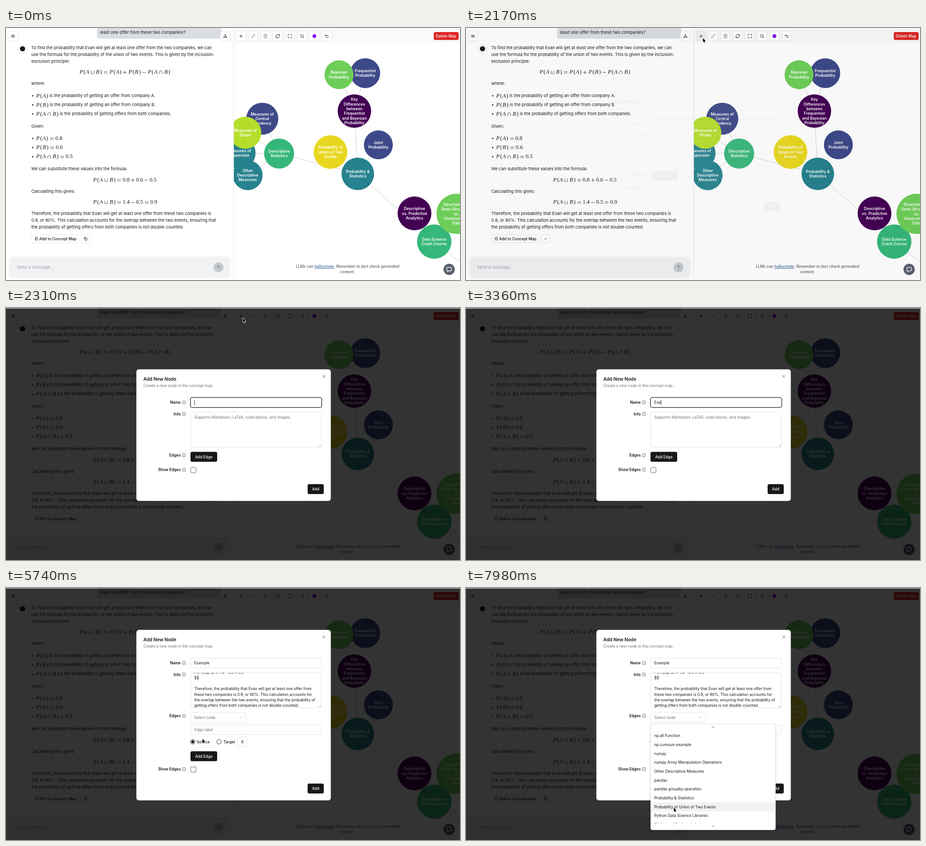
Write an HTML page with a canvas that moves like this. It is 1004 px wide and 558 px high and loops after 8 s.

```html
<!DOCTYPE html>
<html lang="en">
<head>
<meta charset="utf-8">
<title>Concept map</title>
<style>
html, body { margin: 0; width: 100%; height: 100%; overflow: hidden; background: #fff; }
canvas { display: block; width: 1004px; height: 558px; }
</style>
</head>
<body>
<canvas id="stage" width="1004" height="558"></canvas>
<script>
const stage = document.getElementById('stage').getContext('2d');
const layer = Object.assign(document.createElement('canvas'), { width: 1004, height: 558 }).getContext('2d');
let ctx = stage;
const LOOP = 8000, BODY = 9.37, SMALL = 8.37, INK = '#18181b', LINE = '#e4e4e7', HINT = '#71717a';

const ICONS = {
  menu: 'M4 7h16M4 12h16M4 17h16',
  tree: 'M12 6v6l-6 5M12 12l6 5M14 5a2 2 0 1 1-4 0a2 2 0 1 1 4 0M7 18a2 2 0 1 1-4 0a2 2 0 1 1 4 0M21 18a2 2 0 1 1-4 0a2 2 0 1 1 4 0M12 12v6',
  plus: 'M5 12h14M12 5v14',
  pencil: 'M17 3l4 4L8 20l-5 1 1-5zM14 6l4 4',
  trash: 'M3 6h18M19 6v14a2 2 0 0 1-2 2H7a2 2 0 0 1-2-2V6M8 6V4a2 2 0 0 1 2-2h4a2 2 0 0 1 2 2v2M10 11v6M14 11v6',
  refresh: 'M3 12a9 9 0 0 1 15.5-6.2L21 8M21 3v5h-5M21 12a9 9 0 0 1-15.5 6.2L3 16M3 21v-5h5',
  expand: 'M3 8V3h5M16 3h5v5M21 16v5h-5M8 21H3v-5',
  search: 'M18 11a7 7 0 1 1-14 0a7 7 0 1 1 14 0M16 16l5 5',
  undo: 'M9 14L4 9l5-5M4 9h10.5a5.5 5.5 0 0 1 0 11H11',
  copy: 'M9 9h11v12H9zM5 15H4V3h11v3',
  check: 'M5 12l5 5L20 7',
  enter: 'M9 7V3h11v18H9v-4M3 12h11M10 8l4 4-4 4',
  up: 'M12 20V4M5 11l7-7 7 7',
  chat: 'M4 4h16v12h-9l-4 4v-4H4z',
  down: 'M6 9l6 6 6-6',
  upward: 'M6 15l6-6 6 6',
  close: 'M6 6l12 12M18 6L6 18'
};

const clamp = v => Math.min(1, Math.max(0, v));
const easeOut = v => 1 - (1 - clamp(v)) ** 2;
const smooth = v => v * v * (3 - 2 * v);

// Paints a panel as one group: faded as a whole and zoomed about (cx, cy).
function popIn(p, cx, cy, slide, paint) {
  const scale = .95 + .05 * p;
  layer.clearRect(0, 0, 1004, 558);
  layer.save();
  layer.translate(cx, cy - slide * (1 - p));
  layer.scale(scale, scale);
  layer.translate(-cx, -cy);
  ctx = layer;
  paint();
  ctx = stage;
  layer.restore();
  ctx.globalAlpha = p;
  ctx.drawImage(layer.canvas, 0, 0);
  ctx.globalAlpha = 1;
}

function text(str, x, y, { size = SMALL, weight = 400, color = INK, align = 'left', style = 'normal' } = {}) {
  ctx.font = `${style} ${weight} ${size}px Inter, sans-serif`;
  ctx.textAlign = align;
  ctx.fillStyle = color;
  ctx.fillText(str, x, y + size * .36);
  return ctx.measureText(str).width;
}

function box(x, y, w, h, r, fill, stroke, width = 1) {
  ctx.beginPath();
  ctx.roundRect(x, y, w, h, r);
  if (fill) { ctx.fillStyle = fill; ctx.fill(); }
  if (stroke) { ctx.strokeStyle = stroke; ctx.lineWidth = width; ctx.stroke(); }
}

function disc(x, y, r, fill, stroke, width = 1) {
  ctx.beginPath();
  ctx.arc(x, y, r, 0, Math.PI * 2);
  if (fill) { ctx.fillStyle = fill; ctx.fill(); }
  if (stroke) { ctx.strokeStyle = stroke; ctx.lineWidth = width; ctx.stroke(); }
}

function line(x1, y1, x2, y2, color, width = 1) {
  ctx.beginPath();
  ctx.moveTo(x1, y1);
  ctx.lineTo(x2, y2);
  ctx.strokeStyle = color;
  ctx.lineWidth = width;
  ctx.stroke();
}

function icon(name, x, y, size = 10, color = INK, weight = 2.1) {
  ctx.save();
  ctx.translate(x - size / 2, y - size / 2);
  ctx.scale(size / 24, size / 24);
  ctx.strokeStyle = color;
  ctx.lineWidth = weight;
  ctx.lineCap = ctx.lineJoin = 'round';
  ctx.stroke(new Path2D(ICONS[name]));
  ctx.restore();
}

// Formula setting: advances in em, operators drawn as strokes.
const EM = 11.89;
const ADVANCE = { P: .781, A: .75, B: .809, '(': .389, ')': .389, '.': .278,
  '∪': 1.111, '∩': 1.111, '+': 1.222, '−': 1.222, '=': 1.334 };

function operator(ch, cx, cy) {
  const a = EM * .33;
  ctx.beginPath();
  if (ch === '∪' || ch === '∩') {
    const d = ch === '∪' ? 1 : -1, r = EM * .26;
    ctx.moveTo(cx - r, cy - d * 3.6);
    ctx.lineTo(cx - r, cy + d * .4);
    ctx.arc(cx, cy + d * .4, r, Math.PI, 0, d > 0);
    ctx.lineTo(cx + r, cy - d * 3.6);
  } else {
    for (const dy of ch === '=' ? [-1.6, 1.6] : [0]) {
      ctx.moveTo(cx - a, cy + dy);
      ctx.lineTo(cx + a, cy + dy);
    }
    if (ch === '+') { ctx.moveTo(cx, cy - a); ctx.lineTo(cx, cy + a); }
  }
  ctx.strokeStyle = INK;
  ctx.lineWidth = .75;
  ctx.stroke();
}

function math(str, x, y) {
  const base = y + 3.8;
  for (const ch of str.replace(/ /g, '')) {
    const w = (ADVANCE[ch] || .5) * EM;
    if ('∪∩+−='.includes(ch)) operator(ch, x + w / 2, base - EM * .25);
    else {
      ctx.font = `${/[PAB]/.test(ch) ? 'italic' : 'normal'} 12.4px "Liberation Serif", serif`;
      ctx.textAlign = 'center';
      ctx.fillStyle = INK;
      ctx.fillText(ch, x + w / 2, base);
    }
    x += w;
  }
  return x;
}

function toolButton(x, name, color, hover) {
  box(x - 10.75, 7.25, 21.5, 21.5, 3.5, hover ? '#f1f1f2' : '#fff', LINE);
  if (name) icon(name, x, 18, 10.5, color);
}

function drawChat(copied) {
  const para = (str, y) => text(str, 56, y, { size: BODY });
  box(201, -10, 275, 33.5, 6, '#dadde2');
  text('least one offer from these two companies?', 208, 10, { size: BODY });
  toolButton(15.5, 'menu');
  toolButton(485, 'tree');
  disc(36.5, 46, 10, '#fff', LINE);
  disc(36.5, 46, 5.8, INK);

  para('To find the probability that Evan will get at least one offer from the two companies, we can', 44);
  para('use the formula for the probability of the union of two events. This is given by the inclusion-', 58.7);
  para('exclusion principle:', 73.4);
  math('P(A ∪ B) = P(A) + P(B) − P(A ∩ B)', 162, 97.5);
  para('where:', 122.7);
  const bullets = [
    ['P(A)', 149.7, 'is the probability of getting an offer from company A.'],
    ['P(B)', 169.9, 'is the probability of getting an offer from company B.'],
    ['P(A ∩ B)', 190, 'is the probability of getting offers from both companies.'],
    ['P(A) = 0.8', 244.2], ['P(B) = 0.6', 264.4], ['P(A ∩ B) = 0.5', 284.6]
  ];
  for (const [formula, y, rest] of bullets) {
    disc(59, y + .3, 1.5, INK);
    const end = math(formula, 66, y);
    if (rest) text(rest, end + 2.6, y, { size: BODY });
  }
  para('Given:', 217.4);
  para('We can substitute these values into the formula:', 312);
  math('P(A ∪ B) = 0.8 + 0.6 − 0.5', 192, 336);
  para('Calculating this gives:', 361.6);
  math('P(A ∪ B) = 1.4 − 0.5 = 0.9', 192, 385.5);
  para('Therefore, the probability that Evan will get at least one offer from these two companies is', 411);
  para('0.9, or 90%. This calculation accounts for the overlap between the two events, ensuring that', 425.6);
  para('the probability of getting offers from both companies is not double-counted.', 440.2);

  box(56.5, 457.5, 104, 18, 3, '#fff', LINE);
  icon('enter', 66.5, 466.5, 9);
  text('Add to Concept Map', 73.5, 466.5, { weight: 500 });
  box(166.5, 457.5, 20, 18, 3, '#fff', LINE);
  icon(copied ? 'check' : 'copy', 176.3, 466.5, 9);

  ctx.save();
  ctx.shadowColor = 'rgba(0,0,0,.1)';
  ctx.shadowBlur = 5;
  box(9, 508, 485, 44, 6, '#f1f2f3');
  ctx.restore();
  text('Send a message...', 24, 530, { size: BODY, color: '#9ca3af' });
  disc(470, 530, 11, '#c5c9d0');
  icon('up', 470, 530, 14, '#6b7280', 1.7);
}

const NODES = {
  central: [566.8, 200.8, 35.4, '#3e4989', 'Measures of|Central|Tendency'],
  dispersion: [516.5, 277, 35.4, '#26828e', 'Measures of|Dispersion'],
  shape: [529.3, 232, 35.4, '#b5de2b', 'Measures of|Shape'],
  other: [534.5, 326, 33, '#26828e', 'Other|Descriptive|Measures'],
  stats: [604, 278, 33.2, '#35b779', 'Descriptive|Statistics'],
  root: [778, 323, 36, '#26828e', 'Probability &|Statistics'],
  union: [717.6, 274.7, 37.2, '#e8d71e', 'Probability of|Union of Two|Events'],
  joint: [823.5, 258.7, 32, '#3e4989', 'Joint|Probability'],
  key: [770.5, 184, 37, '#440154', 'Key|Differences|between|Frequentist|and Bayesian|Probability'],
  frequent: [794.5, 100, 33, '#3e4989', 'Frequentist|Probability'],
  bayes: [736.5, 103.5, 32, '#6ece58', 'Bayesian|Probability'],
  versus: [903.4, 410.5, 37.4, '#440154', 'Descriptive|vs. Predictive|Analytics'],
  crash: [947, 473, 38, '#35b779', 'Data Science|Crash Course'],
  kinds: [996.5, 411.5, 44.6, '#6ece58', 'Structured vs.|Semi-Structured|vs.|Unstructured|Data']
};
const EDGES = 'stats-central stats-dispersion stats-shape stats-other root-stats root-union root-joint root-key root-crash key-frequent key-bayes crash-versus crash-kinds'.split(' ');

function drawMap(hoverAdd) {
  ctx.save();
  ctx.beginPath();
  ctx.rect(504, 0, 500, 558);
  ctx.clip();
  ctx.fillStyle = '#fff';
  ctx.fillRect(504, 0, 500, 558);
  for (const edge of EDGES) {
    const [a, b] = edge.split('-').map(id => NODES[id]);
    line(a[0], a[1], b[0], b[1], '#ccc');
  }
  line(947, 473, 1010, 523, '#ccc');
  for (const [x, y, r, color, label] of Object.values(NODES)) {
    disc(x, y, r, color);
    const rows = label.split('|');
    rows.forEach((row, i) => text(row, x, y + (i - (rows.length - 1) / 2) * 10.3,
      { size: 8.5, weight: 600, color: '#fff', align: 'center' }));
  }
  ctx.fillStyle = '#f9fafb';
  ctx.fillRect(504, 0, 500, 34);
  ctx.restore();
  line(503.5, 0, 503.5, 558, LINE);

  ['plus', 'pencil', 'trash', 'refresh', 'expand', 'search', '', 'undo'].forEach((name, i) =>
    toolButton(519.7 + 27.05 * i, name, i === 1 || i === 2 ? '#8b8b90' : INK, i === 0 && hoverAdd));
  const swatch = ctx.createLinearGradient(678, 14, 686, 22);
  swatch.addColorStop(0, '#6a11f5');
  swatch.addColorStop(1, '#9a0cf0');
  disc(682, 18, 4.3, swatch);
  box(946, 9, 55, 17.5, 3.5, '#dc2626');
  text('Delete Map', 973.3, 17.8, { weight: 500, color: '#fff', align: 'center' });

  const note = { style: 'italic', color: '#3f3f46' };
  let x = 641;
  x += text('LLMs can ', x, 528, note);
  const w = text('hallucinate', x, 528, { style: 'italic', color: '#1e4a8c' });
  line(x, 532.5, x + w, 532.5, '#1e4a8c', .8);
  text('. Remember to fact check generated', x + w, 528, note);
  text('content.', 755, 540.3, { ...note, align: 'center' });
  disc(980, 534.5, 12.5, '#596070');
  icon('chat', 980, 535, 15, '#fff', 2);
}

const PASTED = ['P(A \\cup B) = 1.4 - 0.5 = 0.9', '$$', '',
  'Therefore, the probability that Evan will get at least one offer from',
  'these two companies is 0.9, or 90%. This calculation accounts for',
  'the overlap between the two events, ensuring that the probability of',
  'getting offers from both companies is not double-counted.'];
const KEY_TIMES = [2940, 3150, 3360, 3430, 3640, 3780, 3850];
const T = { copied: 1360, uncopied: 3360, modal: 2169, info: 4480, paste: 5110, edge: 5740, select: 6480 };

function caret(x, y, t, since) {
  if ((t - since) % 1000 < 500) line(x, y - 5.5, x, y + 5.5, INK, .9);
}

function darkButton(x, y, w, label) {
  box(x, y, w, 22, 3.5, INK);
  text(label, x + w / 2, y + 11, { weight: 500, color: '#fafafa', align: 'center' });
}

function fieldLabel(label, y) {
  text(label, 386.3, y, { weight: 600, align: 'right' });
  disc(393.5, y, 3.8, null, '#3f3f46', .75);
  line(393.5, y - .3, 393.5, y + 2, '#3f3f46', .75);
  disc(393.5, y - 1.7, .5, '#3f3f46');
}

function field(y, h, focused) {
  if (focused) box(407.8, y - .3, 290.4, h + .6, 4, '#fff', INK, 1.3);
  else box(408.5, y, 289, h, 3.5, '#fff', LINE);
}

function paintDialog(t) {
  const withEdge = t >= T.edge, extra = withEdge ? 86 : 0;
  ctx.translate(0, withEdge ? 93 : 136);
  box(288.3, -.2, 430, 291.4 + extra, 5.5, '#fff');
  text('Add New Node', 303.7, 21, { size: 10.1, weight: 600 });
  text('Create a new node in the concept map.', 303.7, 36.3, { color: HINT });
  icon('close', 702.8, 15.2, 10, '#3f3f46', 2);

  fieldLabel('Name', 73);
  field(62.5, 21.5, t < T.info);
  const typed = 'Example'.slice(0, KEY_TIMES.filter(k => t >= k).length);
  const end = 416.4 + text(typed, 416.2, 73.3);
  if (t < T.info) {
    const lastKey = KEY_TIMES.filter(k => t >= k).pop();
    caret(end + .6, 73.5, t, lastKey || 2230);
  }

  fieldLabel('Info', 98.5);
  const infoFocus = t >= T.info && t < T.edge;
  field(94.5, 78, infoFocus);
  if (t < T.paste) {
    text('Supports Markdown, LaTeX, code blocks, and images.', 416.2, 105.6, { color: HINT });
    if (infoFocus) caret(416.6, 105.6, t, T.info);
  } else {
    ctx.save();
    ctx.beginPath();
    ctx.rect(409, 95, 288, 77);
    ctx.clip();
    let w;
    PASTED.forEach((row, i) => w = text(row, 416.2, 93.7 + 12.2 * i));
    if (infoFocus) caret(417 + w, 167, t, T.paste);
    ctx.restore();
  }
  line(692, 171, 696, 167, '#71717a', .7);
  line(694.4, 171, 696, 169.4, '#71717a', .7);

  fieldLabel('Edges', 190);
  if (withEdge) {
    box(408.5, 183, 122, 21.5, 3.5, '#fff', LINE);
    text('Select node', 416.2, 193.6, { color: HINT });
    icon('down', 518, 193.8, 9, '#8b8b90', 2);
    field(210, 21.5, false);
    text('Edge label', 416.2, 220.8, { color: HINT });
    disc(413, 247.5, 5, '#fff', INK, .9);
    disc(413, 247.5, 3.2, INK);
    text('Source', 422, 247.5, { weight: 500 });
    disc(471, 247.5, 5, '#fff', INK, .9);
    text('Target', 481, 247.5, { weight: 500 });
    box(512.5, 237, 20.5, 21.5, 3.5, '#fff', LINE);
    text('X', 522.7, 247.7, { weight: 500, align: 'center' });
  }
  darkButton(408, 182.5 + extra, 59, 'Add Edge');
  fieldLabel('Show Edges', 222 + extra);
  box(408.6, 217.2 + extra, 11.6, 11.6, 1.5, '#fff', '#52525b', .9);
  darkButton(667, 254 + extra, 35.7, 'Add');
}

function drawDialog(t) {
  const p = easeOut((t - T.modal) / 110);
  ctx.fillStyle = `rgba(0,0,0,${.8 * p})`;
  ctx.fillRect(0, 1, 1004, 557);
  popIn(p, 503.3, 281.5, 0, () => paintDialog(t));
}

const OPTIONS = ['Axis-wise Filtering in NumPy', 'Basic numpy Operations', 'Bayesian Probability',
  'Boolean Indexing in pandas', 'Chaining Conditions in pandas', 'Data Science Crash Course',
  'Descriptive Statistics', 'Descriptive vs. Predictive Analytics', 'Filtering a DataFrame in pandas',
  'Filtering a NumPy Array', 'Filtering Using a Boolean Array', 'Frequentist Probability',
  'Joint Probability', 'Key Differences between Frequentist and Bayesian', 'Measures of Central Tendency',
  'Measures of Dispersion', 'Measures of Shape', 'np.all Function', 'np.cumsum example', 'numpy',
  'numpy Array Manipulation Operations', 'Other Descriptive Measures', 'pandas', 'pandas groupby operation',
  'Probability & Statistics', 'Probability of Union of Two Events', 'Python Data Science Libraries',
  'Slicing and Boolean Indexing'];
const ROW = 19.68;

function paintOptions(t, mouse) {
  const scroll = t < 7280 ? 0 : t < 7350 ? 160 : 319;
  const listTop = scroll ? 315 : 302;
  ctx.save();
  ctx.shadowColor = 'rgba(0,0,0,.16)';
  ctx.shadowBlur = 5;
  ctx.shadowOffsetY = 2;
  box(408.5, 301, 275.8, 234.5, 3.5, '#fff');
  ctx.restore();
  box(408.5, 301, 275.8, 234.5, 3.5, null, LINE);
  ctx.save();
  ctx.beginPath();
  ctx.rect(409, listTop, 275, 521 - listTop);
  ctx.clip();
  OPTIONS.forEach((label, i) => {
    const y = 311.6 + ROW * i - scroll;
    if (y < listTop - 12 || y > 533) return;
    if (Math.abs(mouse.y - y) < ROW / 2) box(412, y - 9.8, 269, 19.6, 2.5, '#f1f2f4');
    text(label, 416.2, y);
  });
  ctx.restore();
  if (scroll) icon('upward', 546, 308, 9, INK, 2);
  icon('down', 546, 527.5, 9, INK, 2);
}

// Pointer stops: time, x, y.
const PATH = [[70, 330, 300], [800, 178, 467], [1400, 178, 467], [2000, 523.5, 22], [2310, 523.5, 22],
  [2520, 525, 120], [4130, 523, 170], [4440, 514.5, 252.5], [5200, 514.5, 252.5], [5560, 434, 333.5],
  [5850, 434, 333.5], [6200, 435.5, 291.5], [6600, 435.5, 291.5], [6790, 455, 368],
  [7630, 455, 368], [7980, 459, 486]];
const PRESSES = [[1260, 1360], [2030, 2130], [4480, 4580], [5600, 5740], [6470, 6590]];

function pointerAt(t) {
  const i = PATH.findIndex(stop => stop[0] > t);
  if (i === 0) return { x: PATH[0][1], y: PATH[0][2] };
  if (i < 0) return { x: PATH.at(-1)[1], y: PATH.at(-1)[2] };
  const [t0, x0, y0] = PATH[i - 1], [t1, x1, y1] = PATH[i];
  const k = smooth((t - t0) / (t1 - t0));
  return { x: x0 + (x1 - x0) * k, y: y0 + (y1 - y0) * k };
}

function drawPointer(t, { x, y }) {
  if (t < 70 || (t >= 2940 && t < 4130)) return;
  if (PRESSES.some(([a, b]) => t >= a && t < b)) disc(x, y, 13, null, INK, 1.3);
  const overText = t >= 4130 && t < T.edge && x > 408 && (y > 230 && y < 308 || y > 198 && y < 220);
  ctx.save();
  ctx.translate(x, y);
  ctx.lineJoin = 'round';
  if (overText) {
    const beam = new Path2D('M-2.5-5Q0-5 0-3.5Q0-5 2.5-5M0-3.5V3.5M-2.5 5Q0 5 0 3.5Q0 5 2.5 5M-1.2 1.5h2.4');
    ctx.strokeStyle = '#fff';
    ctx.lineWidth = 2.2;
    ctx.stroke(beam);
    ctx.strokeStyle = '#000';
    ctx.lineWidth = 1;
    ctx.stroke(beam);
  } else {
    const arrow = new Path2D('M.5.5V9.2L2.5 7.4 3.9 10.6 5.4 9.9 4 6.8H6.7Z');
    ctx.strokeStyle = '#fff';
    ctx.lineWidth = 1.6;
    ctx.stroke(arrow);
    ctx.fillStyle = '#000';
    ctx.fill(arrow);
  }
  ctx.restore();
}

function draw(t) {
  const mouse = pointerAt(t);
  ctx.fillStyle = '#fff';
  ctx.fillRect(0, 0, 1004, 558);
  drawChat(t >= T.copied && t < T.uncopied);
  drawMap(t > 1800 && t < 2310 && Math.abs(mouse.x - 519.7) < 11 && mouse.y < 29);
  if (t >= T.modal) drawDialog(t);
  if (t >= T.select) popIn(easeOut((t - T.select) / 150), 546.2, 418.5, 5.3, () => paintOptions(t, mouse));
  drawPointer(t, mouse);
}

const start = performance.now();
function tick() {
  draw((performance.now() - start) % LOOP);
  requestAnimationFrame(tick);
}
tick();
</script>
</body>
</html>
```
